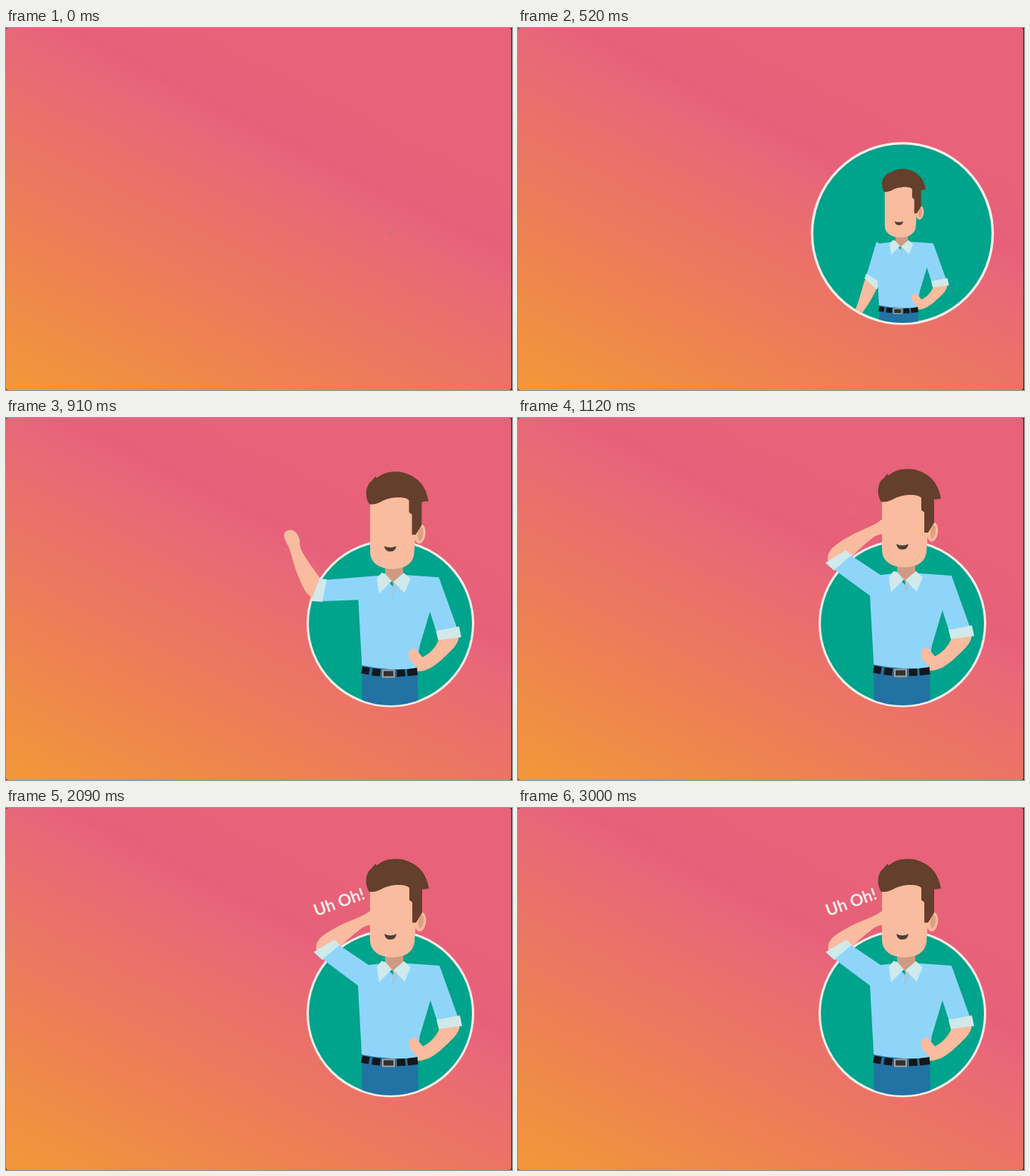
Recreate the animation shown at these times as an HTML page. Size 670 by 480 pixels, loop 3.03 s.

```html
<!DOCTYPE html>
<html lang="en">
<head>
<meta charset="utf-8">
<title>Uh Oh!</title>
<style>
  html, body { margin: 0; width: 100%; height: 100%; overflow: hidden; background: #3b2430; }
  svg {
    display: block; width: 669px; height: 480px; border-radius: 3px;
    background: linear-gradient(27deg, #f1963a 3%, #ed7d58 30%, #e8667a 59%, #e7607a 63%, #e86279 75%);
  }
  text { font: 700 22px Lato, "Open Sans", sans-serif; fill: #fdecec; text-anchor: middle; }
  .skin { fill: #f9bc9e; }
  .shirt { fill: #8fd5fa; }
  .pale { fill: #d0e9ea; }
  .hair { fill: #643f2c; }
</style>
</head>
<body>
<svg viewBox="0 0 669 480">
  <!-- open above the centre, round below it -->
  <clipPath id="porthole">
    <path id="hole" d="M-700 0V-700H700V0H108.5A108.5 108.5 0 0 1 -108.5 0Z"/>
  </clipPath>

  <g id="disc"><circle r="109.5" fill="#00a38b" stroke="#f4efe9" stroke-width="3"/></g>

  <g clip-path="url(#porthole)">
    <g id="man">
      <g id="arm">
        <g id="forearm" class="skin">
          <path d="M0 13L10 12C30 9 45 6 58 6C66 7 69 11 76 11C84 11 89 6 89 0C89 -6 82 -8 70 -7C55 -8 40 -14 10 -14C-18 -14 -17 13 0 13Z"/>
        </g>
        <path class="shirt" d="M-12 14L54 13L60 -15L-6 -17Z"/>
        <path class="pale" d="M51 14L61 15L74 -14L59 -16Z"/>
      </g>

      <!-- arm on the hip -->
      <path class="skin" d="M574 288L601 286C601 297 594 304 581 316C570 327 558 335 546 335C541 335 540 328 540 322C535 320 532 316 534 313C532 309 535 306 538 307C539 302 543 303 546 309L552 316C562 311 570 303 574 292Z"/>

      <path fill="#2272a3" d="M471 326H545L547 420H472Z"/>
      <path class="shirt" d="M474 209L498 206L513 222L531 206L574 209L599 279L571 283L562 255L548 302L544 331Q508 335 471 327L466 235Z"/>
      <path class="skin" d="M541 326C536 320 532 316 534 313C532 309 535 306 538 307C539 302 543 303 546 309L552 317L549 334Z"/>
      <path class="pale" d="M570 281L601 275L604 289L573 293Z"/>

      <path d="M471 333Q508 341 545 335" fill="none" stroke="#15171a" stroke-width="9.5" stroke-dasharray="10 4 11 22 11 3 15"/>
      <rect x="499" y="333.500" width="15" height="9" fill="#30302f" stroke="#a3a19c" stroke-width="2"/>

      <path fill="#cd9b83" d="M502 188H526V204L513 217L502 206Z"/>
      <path fill="#a5c8d8" d="M513 215L519 220L511 237Z"/>
      <path class="pale" d="M497 203L491 211L494 231L511 214L502 204ZM527 203L513 215L528 230L536 211Z"/>

      <ellipse class="skin" cx="549" cy="151" rx="7" ry="13" transform="rotate(8 549 151)"/>
      <ellipse fill="#dda184" cx="549.500" cy="151" rx="3.500" ry="9" transform="rotate(8 549.500 151)"/>
      <path class="skin" d="M482 100V175C482 190 495 198 512 198C530 198 541 189 541 175L543 150V100Z"/>
      <path class="hair" d="M481 111C475 104 475 86 484 80L489 74L491 76C499 69 512 66 524 68C545 73 557 86 560 107L551 108V139L543 152H538V125L534 122V106C530 100 508 101 498 107C491 111 486 112 481 111Z"/>
      <path fill="#4b4038" d="M501 167Q509 171 517 167Q516 174.500 509 174.500Q502 174.500 501 167Z"/>
    </g>
  </g>

  <g id="speech"><text x="0" y="8">Uh Oh!</text></g>
</svg>

<script>
const LOOP = 3030;
const $ = id => document.getElementById(id);
const clamp = x => Math.min(1, Math.max(0, x));
const progress = (t, start, length) => clamp((t - start) / length);
const cubicOut = p => 1 - (1 - p) ** 3;
const backOut = p => 1 + 2.7 * (p - 1) ** 3 + 1.7 * (p - 1) ** 2;
const move = (id, transform) => $(id).setAttribute('transform', transform);

// linear interpolation between [time, value] pairs
function track(t, keys) {
  let [t0, v0] = keys[0];
  for (const [t1, v1] of keys) {
    if (t < t1) return t > t0 ? v0 + (v1 - v0) * (t - t0) / (t1 - t0) : v0;
    [t0, v0] = [t1, v1];
  }
  return v0;
}

function draw(t) {
  const size = Math.max(0, backOut(progress(t, 0, 800)));
  for (const id of ['disc', 'hole']) move(id, `translate(509 272.5) scale(${size})`);

  const grow = cubicOut(progress(t, 240, 855)), rest = 1 - grow;
  move('man', `translate(${494 * rest} ${433 * rest + 95 * rest * rest}) scale(${grow})`);

  // angles below the horizontal, arm pointing left
  const shoulder = track(t, [[500, 76], [760, 30.5], [910, 4], [1125, -35]]);
  const elbow = track(t, [[500, 4], [760, 43], [910, 67], [1125, 112]]);
  move('arm', `translate(476 222) rotate(${180 - shoulder})`);
  move('forearm', `translate(66 0) rotate(${elbow})`);

  const pop = progress(t, 1110, 280);
  move('speech', `translate(441 124.5) rotate(-20) scale(${Math.max(0, backOut(pop))})`);
  $('speech').setAttribute('opacity', clamp(pop * 2));
}

const begin = performance.now();
function tick() {
  draw((performance.now() - begin) % LOOP);
  requestAnimationFrame(tick);
}
tick();
</script>
</body>
</html>
```
